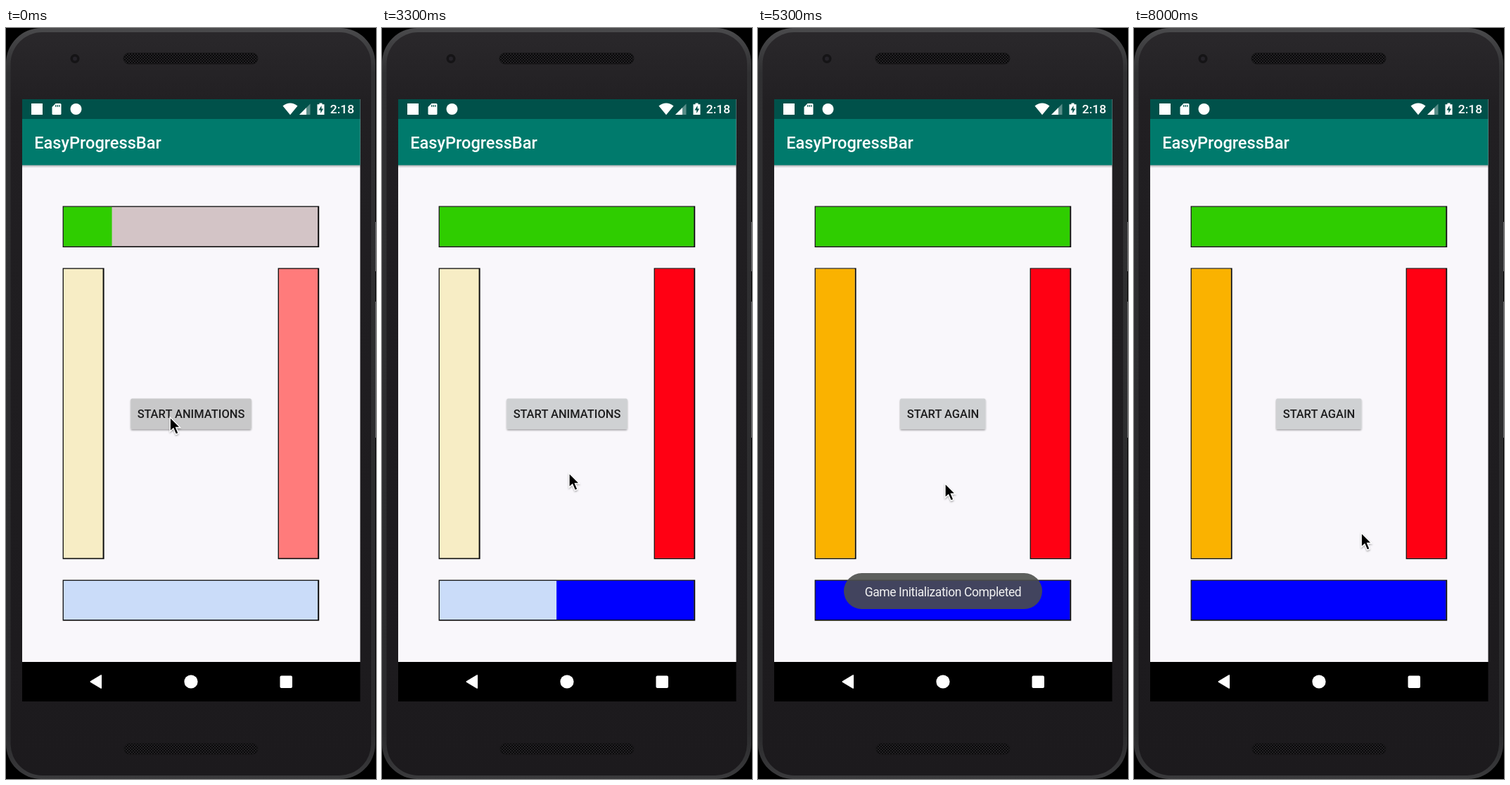
An HTML page that plays this animation: 526 by 1065 pixels, repeating every 8.1 s.

```html
<!DOCTYPE html>
<html lang="en">
<head>
<meta charset="utf-8">
<title>Progress bars</title>
<style>
  html, body { margin: 0; width: 100%; height: 100%; overflow: hidden; background: #000; }
  svg { display: block; width: 526px; height: 1065px; }
  text { font-family: Roboto, sans-serif; }
  .title { font-size: 23.6px; font-weight: 500; fill: #fff; }
  .clock { font-size: 17.4px; font-weight: 500; fill: #fff; }
  .label { font-size: 16.45px; font-weight: 500; fill: #1c1c1d; text-anchor: middle; }
  .toast { font-size: 17.5px; letter-spacing: -.4px; fill: #f2f2f2; text-anchor: middle; }
</style>
</head>
<body>
<svg viewBox="0 0 526 1065" xmlns="http://www.w3.org/2000/svg">
  <defs>
    <linearGradient id="rim" x1="0" y1="0" x2="0" y2="1">
      <stop offset="0" stop-color="#4a4a4c"/>
      <stop offset=".06" stop-color="#303032"/>
      <stop offset=".94" stop-color="#2b2b2d"/>
      <stop offset="1" stop-color="#3a3a3c"/>
    </linearGradient>
    <linearGradient id="body" x1="0" y1="0" x2="0" y2="1">
      <stop offset="0" stop-color="#2a282b"/>
      <stop offset=".1" stop-color="#211f22"/>
      <stop offset="1" stop-color="#1c1a1d"/>
    </linearGradient>
    <linearGradient id="drop" x1="0" y1="0" x2="0" y2="1">
      <stop offset="0" stop-color="#000" stop-opacity=".32"/>
      <stop offset="1" stop-color="#000" stop-opacity="0"/>
    </linearGradient>
    <pattern id="mesh" width="4" height="4" patternUnits="userSpaceOnUse">
      <rect width="4" height="4" fill="#242225"/>
      <circle cx="1" cy="1" r="1.15" fill="#070708"/>
      <circle cx="3" cy="3" r="1.15" fill="#070708"/>
    </pattern>
    <filter id="soft" x="-50%" y="-50%" width="200%" height="200%">
      <feDropShadow dx="0" dy="1.5" stdDeviation="1.2" flood-opacity=".35"/>
    </filter>
  </defs>

  <!-- phone -->
  <rect width="526" height="1065" fill="#000"/>
  <rect x="524" y="275" width="2" height="70" fill="#6a6a6c"/>
  <rect x="524" y="388" width="2" height="193" fill="#6a6a6c"/>
  <rect width="525" height="1065" rx="50" fill="url(#rim)"/>
  <rect x="6.500" y="6" width="512.500" height="1054" rx="45" fill="url(#body)"/>
  <circle cx="98" cy="43.500" r="6.500" fill="#151416"/>
  <circle cx="98" cy="43.500" r="3" fill="#252329"/>
  <rect x="167" y="35.500" width="191" height="15.500" rx="7.750" fill="url(#mesh)" stroke="#161517"/>
  <rect x="168" y="1014.500" width="190" height="15.500" rx="7.750" fill="url(#mesh)" stroke="#161517"/>

  <!-- screen -->
  <rect x="23" y="101" width="480.500" height="798" fill="#f9f7fb"/>
  <rect x="23" y="194" width="480.500" height="4.500" fill="url(#drop)"/>
  <rect x="23" y="101" width="480.500" height="28" fill="#00514a"/>
  <rect x="23" y="129" width="480.500" height="65.500" fill="#007a6c"/>
  <rect x="23" y="899" width="480.500" height="56" fill="#000"/>
  <text class="title" x="40.200" y="171">EasyProgressBar</text>

  <!-- status icons -->
  <g fill="#fff">
    <rect x="36" y="107" width="16" height="16"/>
    <path d="M70.500 107H77a1.500 1.500 0 0 1 1.500 1.500V121.500a1.500 1.500 0 0 1-1.500 1.500H67a1.500 1.500 0 0 1-1.500-1.500V112z"/>
    <path d="M70.800 109v3M73.300 109v3M75.800 109v3" stroke="#00514a" stroke-width="1.200"/>
    <circle cx="99.500" cy="115" r="8"/>
    <path d="M393.500 110.500q10.500-8 21 0L404 123.300z"/>
    <path d="M432.500 107.500V123H417z" opacity=".35"/>
    <path d="M427 113V123H417z"/>
    <path d="M445.500 106.500h4v1.700h3V123h-10V108.200h3z"/>
    <path d="M448.500 110l-4 6.500h2.700v4.500l3.900-6.500h-2.600z" fill="#00514a"/>
  </g>
  <text class="clock" x="460.800" y="121.200">2:18</text>

  <!-- navigation -->
  <g fill="#fff">
    <path d="M120.300 927L135.300 918V936z" stroke="#fff" stroke-width="1.500" stroke-linejoin="round"/>
    <circle cx="263" cy="927" r="9.600"/>
    <rect x="389.500" y="918.500" width="17.500" height="17.500" rx="2"/>
  </g>

  <g id="bars"></g>

  <rect id="button" y="525.500" height="43.500" rx="2" filter="url(#soft)"/>
  <text id="label" class="label" x="263" y="553"></text>

  <g id="toast">
    <rect x="122" y="773" width="282" height="51" rx="25.500" fill="#4b4d4b" fill-opacity=".89"/>
    <text class="toast" x="263" y="805.500">Game Initialization Completed</text>
  </g>

  <path id="cursor" d="M0 0V20L4.700 15.800 8.300 24.200 11.900 22.700 8.400 14.500H14.500z"
    fill="#000" stroke="#fff" stroke-width="1.300" filter="url(#soft)"/>
</svg>

<script>
const LOOP = 8100, STEP = 100;
const $ = id => document.getElementById(id);

// x, y, w, h: outer box; from/to: time and fill level at both ends
const bars = [
  { x: 80.6, y: 252.5, w: 364.6, h: 58.5, back: '#d3c4c6', fill: '#2fcd00', grow: 'right', from: [0, .19], to: [1676, 1] },
  { x: 386.6, y: 340.4, w: 58.6, h: 412.8, back: '#ff7b7b', fill: '#ff0013', grow: 'down', from: [1750, 0], to: [2750, 1] },
  { x: 80.6, y: 782.6, w: 364.6, h: 58, back: '#cadcf9', fill: '#0000ff', grow: 'left', from: [2760, 0], to: [3760, 1] },
  { x: 80.6, y: 340.4, w: 59, h: 412.8, back: '#f7edc5', fill: '#fab200', grow: 'up', from: [3767, 0], to: [4767, 1] }
];

// time, x, y
const cursorPath = [
  [0, 233.2, 552], [1300, 233.2, 552], [1700, 266, 616], [2900, 266, 616],
  [3500, 266, 639], [4400, 266, 639], [4800, 266, 646],
  [7400, 266, 646], [7900, 323.2, 716]
];
const toastFade = [[4800, 0], [5100, 1], [6950, 1], [7350, 0]];

function track(keys, t, i = 1) {
  if (t <= keys[0][0]) return keys[0][i];
  const n = keys.findIndex(k => k[0] > t);
  if (n < 0) return keys[keys.length - 1][i];
  const a = keys[n - 1], b = keys[n];
  return a[i] + (b[i] - a[i]) * (t - a[0]) / (b[0] - a[0]);
}

function setAttrs(el, attrs) {
  for (const name in attrs) el.setAttribute(name, attrs[name]);
}

function addRect(x, y, width, height, fill) {
  const el = document.createElementNS('http://www.w3.org/2000/svg', 'rect');
  setAttrs(el, { x, y, width, height, fill });
  $('bars').append(el);
  return el;
}

for (const b of bars) {
  addRect(b.x, b.y, b.w, b.h, '#0b0b0b');
  b.inner = [b.x + 1.3, b.y + 1.3, b.w - 3.3, b.h - 2.9];
  addRect(...b.inner, b.back);
  b.el = addRect(...b.inner, b.fill);
}

function drawBar(b, t) {
  const [x, y, w, h] = b.inner;
  const p = track([b.from, b.to], t);
  const across = b.grow === 'left' || b.grow === 'right';
  const width = across ? w * p : w;
  const height = across ? h : h * p;
  setAttrs(b.el, {
    x: b.grow === 'left' ? x + w - width : x,
    y: b.grow === 'up' ? y + h - height : y,
    width, height
  });
}

function draw(t) {
  bars.forEach(b => drawBar(b, t));
  const done = t >= 4800;
  $('label').textContent = done ? 'START AGAIN' : 'START ANIMATIONS';
  setAttrs($('button'), {
    x: done ? 202 : 177.3,
    width: done ? 121.5 : 171.5,
    fill: t < 300 ? '#c8c8c9' : '#cfd1d3'
  });
  $('toast').setAttribute('opacity', track(toastFade, t));
  $('cursor').setAttribute('transform', `translate(${track(cursorPath, t, 1)} ${track(cursorPath, t, 2)})`);
}

const start = performance.now();
function tick() {
  const t = (performance.now() - start) % LOOP;
  draw(Math.floor(t / STEP) * STEP);
  requestAnimationFrame(tick);
}
draw(0);
requestAnimationFrame(tick);
</script>
</body>
</html>
```
